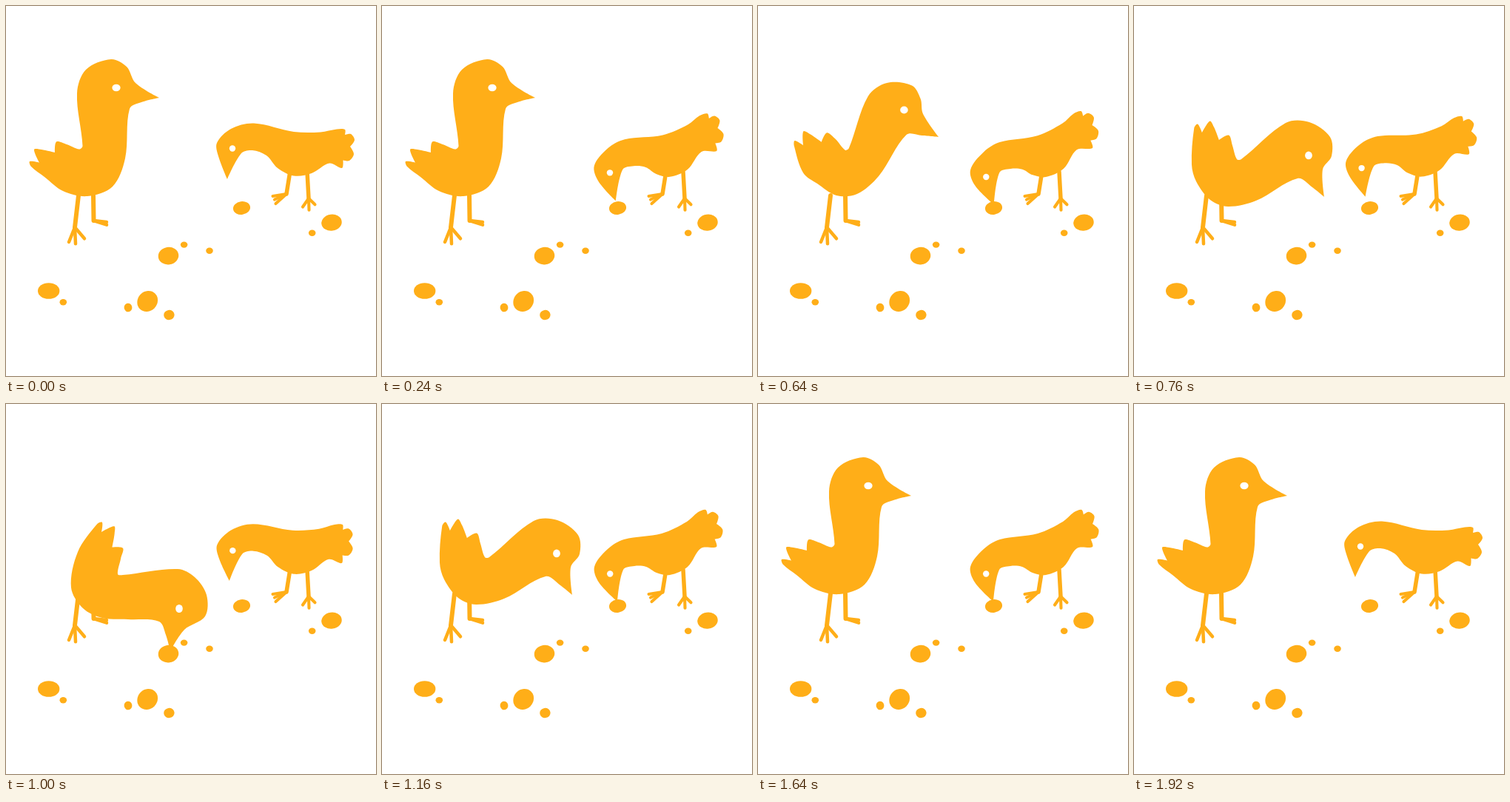
An HTML page with a canvas that plays this animation: 500x500 px, repeating every 1.96 s.

```html
<!DOCTYPE html>
<html lang="en">
<head>
<meta charset="utf-8">
<title>Pecking birds</title>
<style>
html, body { margin: 0; width: 100%; height: 100%; overflow: hidden; background: #fff; }
canvas { display: block; width: 500px; height: 500px; }
</style>
</head>
<body>
<canvas id="stage" width="500" height="500"></canvas>
<script>
const ctx = document.getElementById('stage').getContext('2d');
const COLOR = '#ffae18';
const LOOP = 1960, STEP = 40, BEAT = 480;
const HOOK = 8; // outline point where the stiff tail is attached

// Outlines start at the beak tip; the tail only turns.
const tallUp = [207,124, 183,130, 167,139, 161,206, 144,244, 110,257, 77,250, 52,231,
  32,210, 99,193.5, 103.5,189, 96,118, 108,86, 142,72, 163,82, 175,104];
const tallMid = [257,258, 241,245, 221,233, 165,263, 127,271, 103,262, 84,237, 78,214,
  86,159.5, 139,207, 145,207, 205,158, 237,157, 265,177, 267,203, 255,221];
const tallDown = [222,334, 216,312, 207,294, 165,291, 130,289, 104,276, 88,248, 97,200,
  130,160, 151,230, 158,231, 232,223, 255,234, 271,258, 269,287, 241,305];
const tallTail = [2,7, 0,0, 13,1.5, 6,-16, 16,-16, 34,-12, 36,-26.5, 50,-23];

const smallUp = [299,234, 318,199, 333,195, 352,202, 367,219, 389,229.5, 413,226, 437,212.5,
  454,219, 425,170.5, 389,170, 335,158.5, 304,166, 285,185, 287,203];
const smallDown = [318,267, 326,224, 341,219, 357,220, 371,228, 389,231, 413,220, 431,195,
  452,193, 412,159, 378,175, 327,183, 305,196, 287,220, 293,241];
const smallTail = [0,0, 1.5,-10.5, 10,-10, 16,-19, 11,-29, 17,-38, 12,-46, 4,-45, 4,-52, -7,-52.5];

const tall = {
  at: [0, 0.63, 0.983], poses: [tallUp, tallMid, tallDown],
  tail: tallTail, turn: 1.555, corners: [0, 10, 13],
  eye: [[149, 110.5, 5.6, 4.8], [236, 202, 4.9, 5.3], [234, 276.5, 4.8, 5.6]]
};
const small = {
  at: [0, 0.962], poses: [smallUp, smallDown],
  tail: smallTail, turn: -0.375, corners: [0, 9, 12, 15],
  eye: [[306, 192.5, 4.2, 4.2], [308.2, 229.5, 4.2, 4.2]]
};

// cx, cy, rx, ry, tilt
const grains = [
  [318.5, 273, 11.6, 8.8], [440, 292.7, 13.8, 11], [219.5, 337.6, 13.8, 11.8],
  [57.7, 385, 14.7, 10.8, 0], [165, 407.5, 5.4, 5.8], [191.2, 399, 14.6, 13.2, -0.8],
  [220.4, 417.5, 7.2, 6.7]
];
const crumbs = [[413.7, 306.7], [240.6, 322.6], [275, 330.8], [77.3, 400.3]];

const ease = x => (1 - Math.cos(Math.PI * x)) / 2;

// Polynomial through the poses.
function blend(poses, at, u) {
  const w = at.map((p, i) => at.reduce((s, q, j) => i === j ? s : s * (u - q) / (p - q), 1));
  return poses[0].map((_, k) => poses.reduce((s, pose, i) => s + pose[k] * w[i], 0));
}

const pairs = flat => Array.from({ length: flat.length / 2 }, (_, i) => [flat[2 * i], flat[2 * i + 1]]);

function outline(b, u) {
  const pts = pairs(blend(b.poses, b.at, u));
  const [hx, hy] = pts[HOOK];
  const c = Math.cos(b.turn * u), s = Math.sin(b.turn * u);
  const tail = pairs(b.tail).map(([x, y]) => [hx + x * c - y * s, hy + x * s + y * c]);
  pts.splice(HOOK, 1, ...tail);
  return pts;
}

// Closed smooth curve, sharp at the given corners.
function blob(pts, corners) {
  const n = pts.length;
  const pt = i => pts[(i + n) % n];
  const dist = (a, b) => Math.hypot(a[0] - b[0], a[1] - b[1]);
  const handle = (i, len) => {
    const p = pt(i);
    if (corners.includes(i % n)) return p;
    const a = pt(i - 1), b = pt(i + 1);
    const k = len / 3 / (dist(a, p) + dist(p, b));
    return [p[0] + (b[0] - a[0]) * k, p[1] + (b[1] - a[1]) * k];
  };
  ctx.beginPath();
  ctx.moveTo(...pt(0));
  for (let i = 0; i < n; i++) {
    const len = dist(pt(i), pt(i + 1));
    ctx.bezierCurveTo(...handle(i, len), ...handle(i + 1, -len), ...pt(i + 1));
  }
  ctx.fill();
}

function oval(x, y, rx, ry, tilt = -0.15) {
  ctx.beginPath();
  ctx.ellipse(x, y, rx, ry, tilt, 0, Math.PI * 2);
  ctx.fill();
}

function line(x1, y1, x2, y2, width) {
  ctx.lineWidth = width;
  ctx.beginPath();
  ctx.moveTo(x1, y1);
  ctx.lineTo(x2, y2);
  ctx.stroke();
}

function leg(hx, hy, ax, ay, width, toes) {
  line(hx, hy, ax, ay, width);
  toes.forEach(([x, y]) => line(ax, ay, x, y, width * 0.75));
}

function bird(b, u) {
  ctx.fillStyle = COLOR;
  blob(outline(b, u), b.corners);
  ctx.fillStyle = '#fff';
  oval(...blend(b.eye, b.at, u), 0);
}

// One slow bow in the middle of the loop.
const tallBend = t => ease(Math.max(0, 1 - Math.abs(t - 2 * BEAT) / BEAT));

// Four pecks: quick down, slower up.
function smallBend(t) {
  const p = t % BEAT;
  return p < 160 ? ease(p / 160) : ease((BEAT - p) / 320);
}

function draw(now) {
  const t = Math.floor((now % LOOP) / STEP) * STEP;
  ctx.fillStyle = '#fff';
  ctx.fillRect(0, 0, 500, 500);
  ctx.strokeStyle = COLOR;
  ctx.lineCap = 'round';
  leg(98, 256, 93, 299, 6, [[85, 319], [94, 321.3], [106, 314.3]]);
  leg(118, 256, 118.5, 290, 6, [[136, 295.7], [136, 292]]);
  leg(383.5, 226, 379, 254, 5.5, [[360.5, 257], [363, 261.5], [364.5, 267]]);
  leg(407, 224, 409, 260, 5.5, [[401, 271.5], [409.5, 275.7], [417.5, 268.3]]);
  bird(tall, tallBend(t));
  bird(small, smallBend(t));
  ctx.fillStyle = COLOR;
  grains.forEach(g => oval(...g));
  crumbs.forEach(([x, y]) => oval(x, y, 4.8, 4.2, 0));
}

const start = performance.now();
function tick() {
  draw(performance.now() - start);
  requestAnimationFrame(tick);
}
tick();
</script>
</body>
</html>
```
